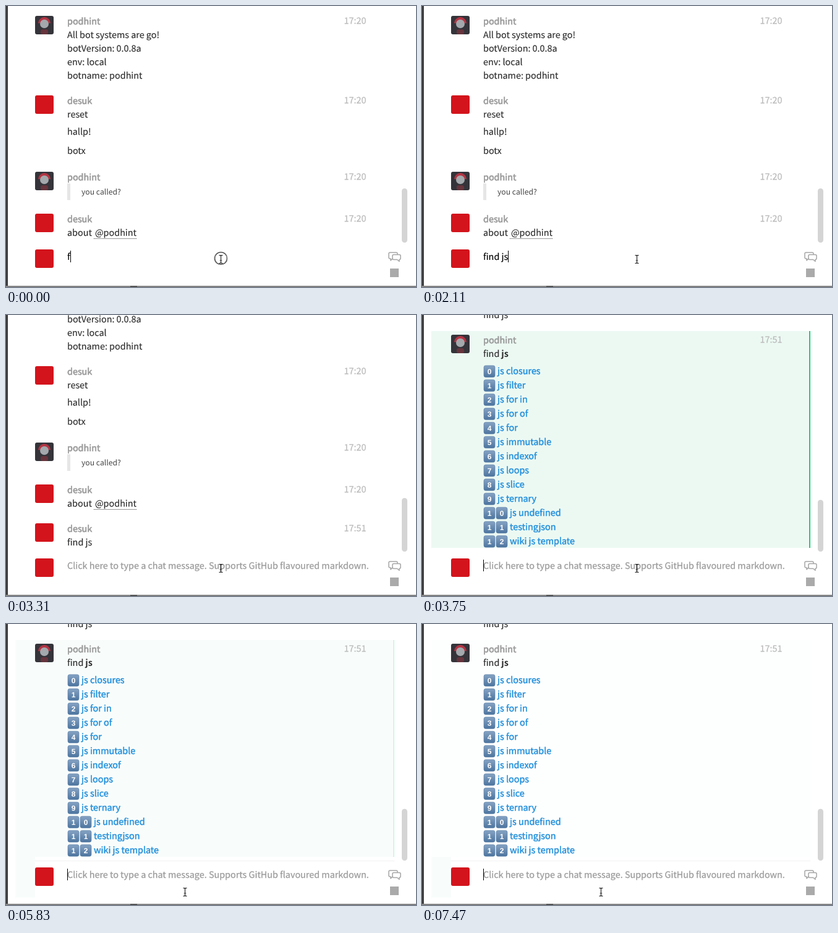
These frames come from a looping animation (663 by 456 pixels, 8 s). An HTML page:

```html
<!DOCTYPE html>
<html lang="en">
<head>
<meta charset="utf-8">
<title>Chat bot search</title>
<style>
html, body { margin: 0; width: 100%; height: 100%; overflow: hidden; background: #fff; }
#stage { display: block; width: 663px; height: 456px; }
text {
  font: 14.38px "Noto Sans CJK JP", "Noto Sans CJK SC", "Noto Sans CJK", "Open Sans", sans-serif;
  fill: #2c2c2c; stroke: #2c2c2c; stroke-width: .15px;
  white-space: pre; text-rendering: geometricPrecision;
}
.name { fill: #999; stroke: #999; stroke-width: .6px; }
.time { fill: #bbb; stroke: #bbb; stroke-width: .25px; }
.quote { font-size: 12.2px; fill: #444; stroke: none; }
.link { fill: #2490dc; stroke: #2490dc; stroke-width: .45px; }
.hint { fill: #999; stroke: #999; stroke-width: .25px; }
.key { fill: #fff; stroke: none; font: bold 12px "Liberation Sans", sans-serif; text-anchor: middle; }
.bold { font-weight: 700; stroke: none; }
.typed { fill: #000; stroke: #000; }

.log, .draft, .cover, .caret, .blink, .hint, .thumb, .mouse, .ring, .rule { animation: 8s step-end infinite; }
.log { animation-name: log; }
.draft { animation-name: draft; }
.hint { animation-name: hint; }
.cover, .caret { animation-name: type; }
.blink { animation-name: blink; }
.thumb { animation-name: thumb; }
.mouse { animation-name: mouse; }
.ring { animation-name: ring; }
.rule { animation-name: rule; }
.tint, .edge, .spill, .rest { animation: 8s linear infinite; }
.tint { animation-name: tint; }
.edge { animation-name: edge; }
.spill { animation-name: spill; }
.rest { animation-name: rest; }

@keyframes log {
  0% { transform: none; }
  33.875% { transform: translateY(-62px); }
  46.875%, 100% { transform: translateY(-431px); }
}
@keyframes draft { 0% { opacity: 1; } 33.875%, 100% { opacity: 0; } }
@keyframes hint { 0% { opacity: 0; } 33.875%, 100% { opacity: 1; } }
@keyframes type {
  0% { transform: translateX(104px); }
  1.875% { transform: translateX(116px); }
  15.25% { transform: translateX(125px); }
  18.875% { transform: translateX(128px); }
  26.375% { transform: translateX(139px); }
  33.875%, 100% { transform: translateX(99px); }
}
@keyframes blink {
  0%, 13.375%, 46.875%, 58%, 69.125%, 80.25%, 93.375%, 100% { opacity: 1; }
  7.875%, 41.375%, 52.5%, 63.5%, 74.75%, 87.75% { opacity: 0; }
}
@keyframes thumb {
  0% { y: 296px; height: 88px; }
  33.875% { y: 297px; height: 87px; }
  46.875%, 100% { y: 300px; height: 84px; }
}
@keyframes mouse {
  0% { transform: translate(347.5px, 411px); opacity: 1; }
  56.25% { transform: translate(347.5px, 411px); opacity: 0; }
  63.5%, 100% { transform: translate(289.5px, 435px); opacity: 1; }
}
@keyframes ring { 0% { opacity: 1; } 1.875%, 100% { opacity: 0; } }
@keyframes rule { 0% { opacity: 0; } 63.5%, 100% { opacity: 1; } }
@keyframes tint {
  0%, 51% { opacity: 1; }
  59.9% { opacity: .65; }
  72.9% { opacity: .38; }
  90%, 100% { opacity: .1; }
}
@keyframes edge {
  0%, 51% { opacity: 1; }
  59.9% { opacity: .6; }
  72.9% { opacity: .17; }
  82.2%, 100% { opacity: 0; }
}
@keyframes spill {
  0%, 52.49% { opacity: 0; }
  52.5% { opacity: .9; }
  59.9% { opacity: .65; }
  63.5% { opacity: .5; }
  69.2%, 100% { opacity: 0; }
}
@keyframes rest {
  0%, 52.49% { opacity: 0; }
  52.5% { opacity: .9; }
  59.9% { opacity: .65; }
  72.9%, 100% { opacity: .38; }
}
</style>
</head>
<body>
<svg id="stage" viewBox="0 0 663 456">
  <defs>
    <linearGradient id="keyFill" x2="0" y2="1">
      <stop stop-color="#86a3c3"/><stop offset="1" stop-color="#4d759f"/>
    </linearGradient>
    <g id="bot">
      <rect width="30" height="30" rx="3" fill="#34343a"/>
      <path d="M5 12a10 10 0 0 1 20 0z" fill="#b23443"/>
      <circle cx="15" cy="13" r="7" fill="#a3a9ac"/>
      <rect x="9" y="22" width="12" height="8" rx="3" fill="#66343c"/>
    </g>
    <rect id="user" width="30" height="30" rx="3" fill="#d3141c"/>
  </defs>
  <rect width="663" height="456" fill="#fff"/>
  <g fill="#ecf9f3">
    <rect class="rest" x="15" y="378" width="32" height="66"/>
    <rect class="spill" x="47" y="378" width="581" height="66"/>
  </g>
  <svg width="663" height="385"><g class="log" id="log"></g></svg>
  <rect class="rule" x="47" y="384" width="581" height="1" fill="#f0f2f1"/>

  <use href="#user" x="47" y="395"/>
  <g class="draft">
    <text class="typed" x="99" y="412">find js</text>
    <rect class="cover" y="394" width="60" height="26" fill="#fff"/>
  </g>
  <text class="hint" x="99" y="412">Click here to type a chat message. Supports GitHub flavoured markdown.</text>
  <g class="caret"><rect class="blink" y="397" width="1" height="19" fill="#000"/></g>

  <g fill="#fff" stroke="#a5a5a5" stroke-width="1.5" stroke-linejoin="round">
    <path d="M621 400h10a2 2 0 0 1 2 2v6a2 2 0 0 1-2 2h-6l-3 3v-3h-1a2 2 0 0 1-2-2v-6a2 2 0 0 1 2-2z"/>
    <path d="M627 403.500h9a2 2 0 0 1 2 2v4a2 2 0 0 1-2 2v3l-3.500-3h-5.500a2 2 0 0 1-2-2v-4a2 2 0 0 1 2-2z"/>
  </g>
  <rect x="621" y="426" width="14" height="14" fill="#aaa"/>
  <rect class="thumb" x="640" y="296" width="9" height="88" rx="4.500" fill="#d4d4d4"/>
  <rect width="3" height="456" fill="#3a3a3c"/>
  <rect y="454" width="663" height="2" fill="#858585"/>
  <rect x="201" y="454" width="11" height="2" fill="#555"/>

  <g class="mouse" fill="none" stroke="#111" stroke-width="1.200">
    <circle class="ring" cy="-1.500" r="10"/>
    <path d="M-3-6.500h2l1 1 1-1h2M0-5.500v11M-3 6.500h2l1-1 1 1h2M-1.500 2h3"/>
  </g>
</svg>
<script>
const BOT = "podhint", USER = "desuk";
const log = document.getElementById("log");

function add(tag, attrs, content = "") {
  const el = document.createElementNS("http://www.w3.org/2000/svg", tag);
  for (const key in attrs) el.setAttribute(key, attrs[key]);
  el.textContent = content;
  log.append(el);
}

const write = (x, y, content, cls = "") => add("text", { x, y, class: cls }, content);

// y is the top of the avatar; later lines are given as [baseline offset, text]
function post(y, who, time, ...lines) {
  add("use", { href: who === BOT ? "#bot" : "#user", x: 47, y });
  write(99, y + 14, who, "name");
  write(546.5, y + 13, time, "time");
  for (const [dy, line] of lines) write(99, y + dy, line);
}

function keycap(x, y, digit) {
  add("rect", { x, y: y - 14, width: 18, height: 19, rx: 3, fill: "url(#keyFill)", stroke: "#557ba5", "stroke-width": .6 });
  write(x + 9, y, digit, "key");
}

post(16, BOT, "17:20", [36, "All bot systems are go!"], [58, "botVersion: 0.0.8a"],
  [80, "env: local"], [102, "botname: " + BOT]);
post(145, USER, "17:20", [36, "reset"], [64, "hallp!"], [95, "botx"]);
post(269, BOT, "17:20");
add("rect", { x: 99, y: 288, width: 5, height: 27, fill: "#e6e6e6" });
write(122, 306, "you called?", "quote");
post(337, USER, "17:20", [36, "about"]);
write(144, 373, "@" + BOT);
add("path", { d: "M142 377.500h70", stroke: "#333", "stroke-dasharray": "1 1" });
post(400, USER, "17:51", [36, "find js"]);

// The reply sits one long scroll further down the log.
const replyTop = 431 + 26;
add("rect", { x: 15, y: replyTop, width: 613, height: 352, fill: "#ecf9f3", class: "tint" });
add("rect", { x: 626, y: replyTop, width: 2, height: 352, fill: "#1dce73", class: "edge" });
post(replyTop + 6, BOT, "17:51", [36, "find "]);
write(128.3, replyTop + 42, "js", "bold");

["js closures", "js filter", "js for in", "js for of", "js for", "js immutable", "js indexof",
  "js loops", "js slice", "js ternary", "js undefined", "testingjson", "wiki js template"
].forEach((topic, i) => {
  const y = replyTop + 70 + i * 23, digits = [...String(i)];
  digits.forEach((digit, k) => keycap(100 + k * 20, y, digit));
  write(102 + digits.length * 20, y, topic, "link");
});
</script>
</body>
</html>
```
